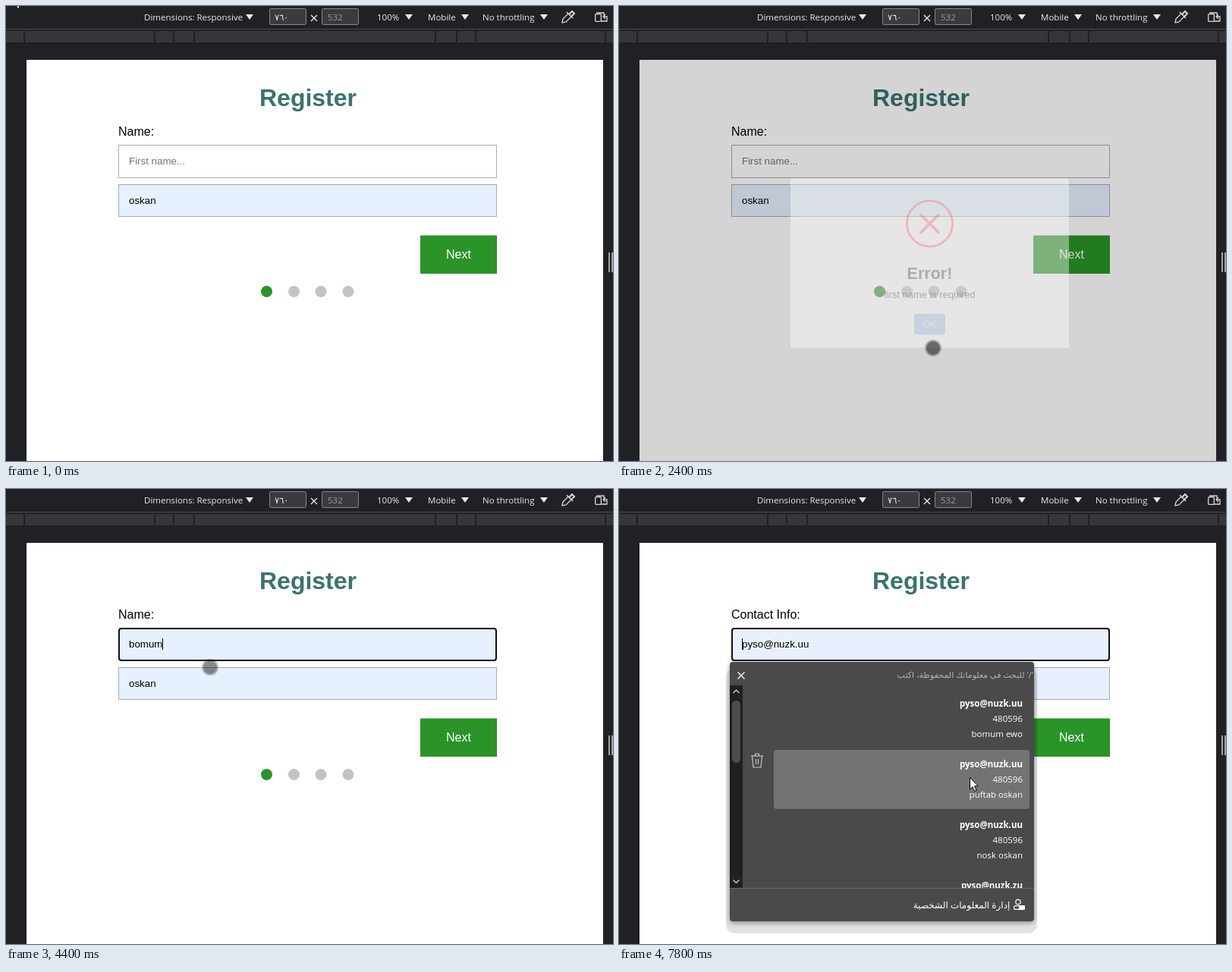
Recreate the animation shown at these times as an HTML page with a canvas. Size 800 by 600 pixels, loop 8 s.

```html
<!DOCTYPE html>
<html lang="en">
<head>
<meta charset="utf-8">
<title>Register form</title>
<style>
html, body { margin: 0; width: 100%; height: 100%; overflow: hidden; background: #202124; }
canvas { display: block; }
</style>
</head>
<body>
<canvas id="stage" width="800" height="600"></canvas>
<script>
const c = document.getElementById('stage').getContext('2d');
const LOOP = 8000, STEP = 100;
const FORM = '"Liberation Sans", Arial, sans-serif';
const UI = '"Open Sans", "Noto Sans", "DejaVu Sans", sans-serif';
const GREEN = '#2a9428', FILLED = '#e6f0ff', PREVIEW = '#e8effe';
const FIRST = 'bomum', LAST = 'oskan', MAIL = 'pyso@nuzk.uu', PHONE = '480596';
const PEOPLE = ['bomum ewo', 'puftab oskan', 'nosk oskan', 'nosk oskan'];

// pointer positions: time, x, y
const PATH = [
  [0, 9, -15], [200, 9, -15], [1000, 569, 336], [1100, 569, 336],
  [1300, 603, 334], [1400, 603, 334], [2200, 414, 451], [2400, 414, 451],
  [2900, 265, 216], [3400, 265, 216], [3500, 265, 226], [3700, 300, 300],
  [3800, 300, 300], [4100, 285, 285], [4400, 269, 235], [4700, 603, 334],
  [4800, 603, 334], [5400, 596, 333], [5600, 596, 333], [5900, 576, 305],
  [6000, 576, 305], [6500, 192, 212], [6700, 192, 212], [7100, 230, 226],
  [7200, 230, 226], [7800, 462, 380], [8000, 462, 380]
];

const clamp = v => Math.max(0, Math.min(1, v));
const mix = (a, b, p) => a + (b - a) * p;
const within = (t, a, b) => t >= a && t < b;

function pointerAt(t) {
  const i = PATH.findIndex(k => k[0] > t);
  const [t0, x0, y0] = PATH[i - 1], [t1, x1, y1] = PATH[i];
  const p = (t - t0) / (t1 - t0), e = p * p * (3 - 2 * p);
  return { x: mix(x0, x1, e), y: mix(y0, y1, e) };
}

function rect(x, y, w, h, fill, r = 0) {
  c.fillStyle = fill;
  c.beginPath();
  c.roundRect(x, y, w, h, r);
  c.fill();
}

function frame(x, y, w, h, color, lw = 1, r = 0) {
  c.strokeStyle = color;
  c.lineWidth = lw;
  c.beginPath();
  c.roundRect(x + lw / 2, y + lw / 2, w - lw, h - lw, r);
  c.stroke();
}

function disc(x, y, r, fill) {
  c.fillStyle = fill;
  c.beginPath();
  c.arc(x, y, r, 0, 7);
  c.fill();
}

function trace(points) {
  c.beginPath();
  for (let i = 0; i < points.length; i += 2) c.lineTo(points[i], points[i + 1]);
}

function line(points, color, lw = 1) {
  trace(points);
  c.strokeStyle = color;
  c.lineWidth = lw;
  c.stroke();
}

function text(s, x, y, size, color, { font = FORM, weight = '', align = 'left' } = {}) {
  c.font = `${weight} ${size}px ${font}`;
  c.textAlign = align;
  c.fillStyle = color;
  c.fillText(s, x, y);
}

function toolbar() {
  rect(0, 0, 800, 600, '#202124');
  rect(0, 30, 800, 1, '#4a4c50');
  rect(0, 33, 800, 15, '#35363a');
  for (const x of [23, 195, 220, 247, 565, 593, 618, 789]) rect(x, 33, 2, 15, '#202124');

  const label = (s, x, color = '#e8eaed') => text(s, x, 19, 11.5, color, { font: UI });
  rect(347, 3, 49, 22, '#3a3b3e', 2);
  frame(347, 3, 49, 22, '#85878a', 1, 2);
  rect(416, 3, 49, 22, '#3a3b3e', 2);
  frame(416, 3, 49, 22, '#85878a', 1, 2);
  label('Dimensions: Responsive', 182);
  label('٧٦٠', 354);
  label('532', 424, '#9a9a9a');
  label('100%', 489);
  label('Mobile', 556);
  label('No throttling', 628);
  line([402, 12, 410, 20], '#e8eaed', 1.3);
  line([410, 12, 402, 20], '#e8eaed', 1.3);
  for (const x of [321, 531, 605, 709]) {
    trace([x - 5, 11, x + 5, 11, x, 18]);
    c.fillStyle = '#e8eaed';
    c.fill();
  }

  // eyedropper and rotate icons
  line([741, 10, 734, 17, 733, 22, 738, 21, 745, 14], '#d5d7da', 1.3);
  line([739, 8, 747, 16], '#d5d7da', 1.6);
  line([742, 11, 746, 7, 749, 10, 745, 14], '#d5d7da', 2);
  frame(776, 10, 9, 11, '#d5d7da', 1.3, 1);
  line([778, 9, 788, 9, 788, 12], '#d5d7da', 1.3);
  line([784, 20, 792, 20, 792, 14, 788, 14], '#d5d7da', 1.3);
  line([790, 11, 787, 14, 790, 17], '#d5d7da', 1.3);

  rect(794, 325, 2, 26, '#a5a5a5');
  rect(798, 325, 2, 26, '#a5a5a5');
}

function field(y, h, hint, value, fill, focused) {
  rect(148, y, 499, h, fill, focused ? 3 : 0);
  if (focused) frame(148, y, 499, h, '#101010', 2, 3);
  else frame(148, y, 499, h, '#aaaaaa');
  text(value || hint, 162, y + 26, 13.333, value ? '#000' : '#757575');
}

function button(s, x, fill, tapped) {
  rect(x, 302.5, 101, 50.5, fill);
  if (tapped) rect(x, 302.5, 101, 50.5, 'rgba(51,181,229,.4)');
  text(s, x + 50.5, 333, 16, '#fff', { align: 'center' });
}

function form(t, list, row) {
  const contact = t >= 5600;
  const focused = within(t, 3100, 5600) || t >= 6800;
  const chosen = within(t, 4200, 5600), preview = row >= 0;
  const value = contact ? (preview ? MAIL : '') : (chosen || preview ? FIRST : '');

  rect(27, 71, 760, 529, '#fff');
  text('Register', 398, 132, 32, '#39736f', { weight: 'bold', align: 'center' });
  text(contact ? 'Contact Info:' : 'Name:', 148, 171, 16, '#000');
  field(183, 44, contact ? 'E-mail...' : 'First name...', value,
    chosen ? FILLED : preview ? PREVIEW : '#fff', focused);
  if (focused && !within(t, 4900, 5400)) {
    const x = 162 + (chosen ? c.measureText(value).width : 0);
    rect(Math.round(x), 197, 1, 15, '#000');
  }
  if (contact) field(235, 43, 'Phone...', preview ? PHONE : '', preview ? PREVIEW : '#fff');
  else field(235, 43, '', LAST, list ? PREVIEW : FILLED);
  if (contact) button('Previous', 429.5, '#8b8f88');
  button('Next', 546, GREEN, t === 1500 || t === 5600);
  [343.5, 379.5, 415, 451].forEach((x, i) =>
    disc(x, 376.5, 7.5, i === +contact ? GREEN : '#c3c3c3'));
}

function suggestions(contact, row) {
  const right = { font: UI, align: 'right' };
  c.save();
  c.shadowColor = 'rgba(0,0,0,.15)';
  c.shadowBlur = 3;
  rect(141, 236, 410, 350, 'rgba(0,0,0,.1)', 12);
  c.shadowColor = 'rgba(0,0,0,.4)';
  c.shadowBlur = 6;
  c.shadowOffsetY = 2;
  rect(146, 228, 401, 342, '#4a4a4a', 4);
  c.restore();

  line([156.5, 241.5, 165.5, 250.5], '#fff', 1.2);
  line([165.5, 241.5, 156.5, 250.5], '#fff', 1.2);
  text("للبحث في معلوماتك المحفوظة، اكتب '/'", 534, 249, 11, '#b4b4b4', right);
  rect(146, 259, 17, 267, '#202020');
  rect(149, 279, 11, contact ? 82 : 91, '#4d4d4d', 5.5);
  line([150.5, 269, 154.5, 265, 158.5, 269], '#e0e0e0', 1.2);
  line([150.5, 515.5, 154.5, 519.5, 158.5, 515.5], '#e0e0e0', 1.2);

  c.save();
  c.beginPath();
  c.rect(146, 259, 401, 267);
  c.clip();
  if (row >= 0) {
    const y = 264 + row * 80;
    rect(204, y, 337, 78, '#737373', 4);
    line([174, y + 8, 190, y + 8], '#c4c4c4', 1.2);
    line([179, y + 8, 180, y + 5, 184, y + 5, 185, y + 8], '#c4c4c4', 1.2);
    line([175.5, y + 8, 177, y + 23, 187, y + 23, 188.5, y + 8], '#c4c4c4', 1.2);
    line([180.5, y + 12, 180.5, y + 19], '#c4c4c4', 1.2);
    line([183.5, y + 12, 183.5, y + 19], '#c4c4c4', 1.2);
  }
  PEOPLE.forEach((name, i) => {
    const mail = i < 3 ? MAIL : 'pyso@nuzk.zu';
    const lines = contact ? [mail, PHONE, name] : [name, mail, PHONE];
    lines.forEach((s, j) => text(s, 532, 287 + i * 80 + j * 20, 11.5, '#fff',
      { ...right, weight: j ? '' : 'bold' }));
  });
  c.restore();

  rect(146, 526, 401, 1, '#6a6a6a');
  text('إدارة المعلومات الشخصية', 507, 553, 12, '#fff', right);
  c.strokeStyle = '#fff';
  c.lineWidth = 1.2;
  c.beginPath();
  c.arc(526, 544.5, 3.2, 0, 7);
  c.stroke();
  frame(520, 549, 11, 6, '#fff', 1.2, 2);
  rect(527, 549, 8, 6, '#fff', 1);
}

function popScale(age) {
  if (age < 135) return mix(.7, 1.05, age / 135);
  if (age < 240) return mix(1.05, .95, (age - 135) / 105);
  return mix(.95, 1, clamp((age - 240) / 60));
}

function alertBox(t) {
  const closing = t >= 2400, age = t - 1550;
  c.fillStyle = `rgba(0,0,0,${closing ? .17 : .4 * clamp(age / 100)})`;
  c.fillRect(27, 71, 760, 529);

  // grouped opacity: the panel's parts are blended one by one
  c.save();
  c.globalAlpha = closing ? .41 : 1;
  c.translate(409.5, 339);
  const s = closing ? .717 : popScale(age);
  c.scale(s, s);
  rect(-256, -156, 512, 312, '#fff', 5);
  text('Error!', 0, 29, 30, '#595959', { weight: 'bold', align: 'center' });
  text('first name is required', 0, 63.5, 18, '#545454', { align: 'center' });
  rect(-28.5, 93.5, 57, 38, '#9cb0d9', 4);
  text('OK', 0, 118.5, 17, '#fff', { align: 'center' });

  const p = clamp(age / 500);
  c.translate(0, -72.5);
  c.scale(1, Math.cos((1 - p) * 100 * Math.PI / 180));
  c.globalAlpha *= p;
  frame(-44, -44, 88, 88, '#f27474', 4, 42);
  const m = p < .5 ? .4 : p < .8 ? mix(.4, 1.15, (p - .5) / .3) : mix(1.15, 1, (p - .8) / .2);
  c.scale(m, m);
  c.lineCap = 'round';
  c.strokeStyle = '#f27474';
  c.lineWidth = 5;
  c.beginPath();
  c.moveTo(-16, -16); c.lineTo(16, 16);
  c.moveTo(16, -16); c.lineTo(-16, 16);
  c.stroke();
  c.restore();
}

function arrow(x, y) {
  c.save();
  c.translate(x, y);
  trace([.5, .5, .5, 16, 4, 12.7, 6.5, 18.5, 9, 17.4, 6.6, 11.8, 11.3, 11.8]);
  c.closePath();
  c.fillStyle = '#fff';
  c.fill();
  c.strokeStyle = '#000';
  c.lineWidth = 1;
  c.stroke();
  c.restore();
}

function touch(x, y, pressed) {
  disc(x, y, 11, 'rgba(0,0,0,.25)');
  disc(x, y, 9, `rgba(0,0,0,${pressed ? .38 : .28})`);
}

function draw(t) {
  const { x, y } = pointerAt(t);
  const list = within(t, 3100, 4200) || t >= 6800;
  const row = list && y >= 264 ? Math.floor((y - 264) / 80) : -1;
  toolbar();
  form(t, list, row);
  if (within(t, 1600, 2500)) alertBox(t);
  if (list) suggestions(t >= 5600, row);
  if (y < 71 || (list && y >= 238)) arrow(x, y);
  else {
    const pressed = [1300, 2300, 3000, 5500].some(d => within(t, d, d + 201)) || t === 3500;
    touch(x, y, pressed);
  }
}

function tick(now) {
  draw(Math.floor(now % LOOP / STEP) * STEP);
  requestAnimationFrame(tick);
}
requestAnimationFrame(tick);
</script>
</body>
</html>
```
